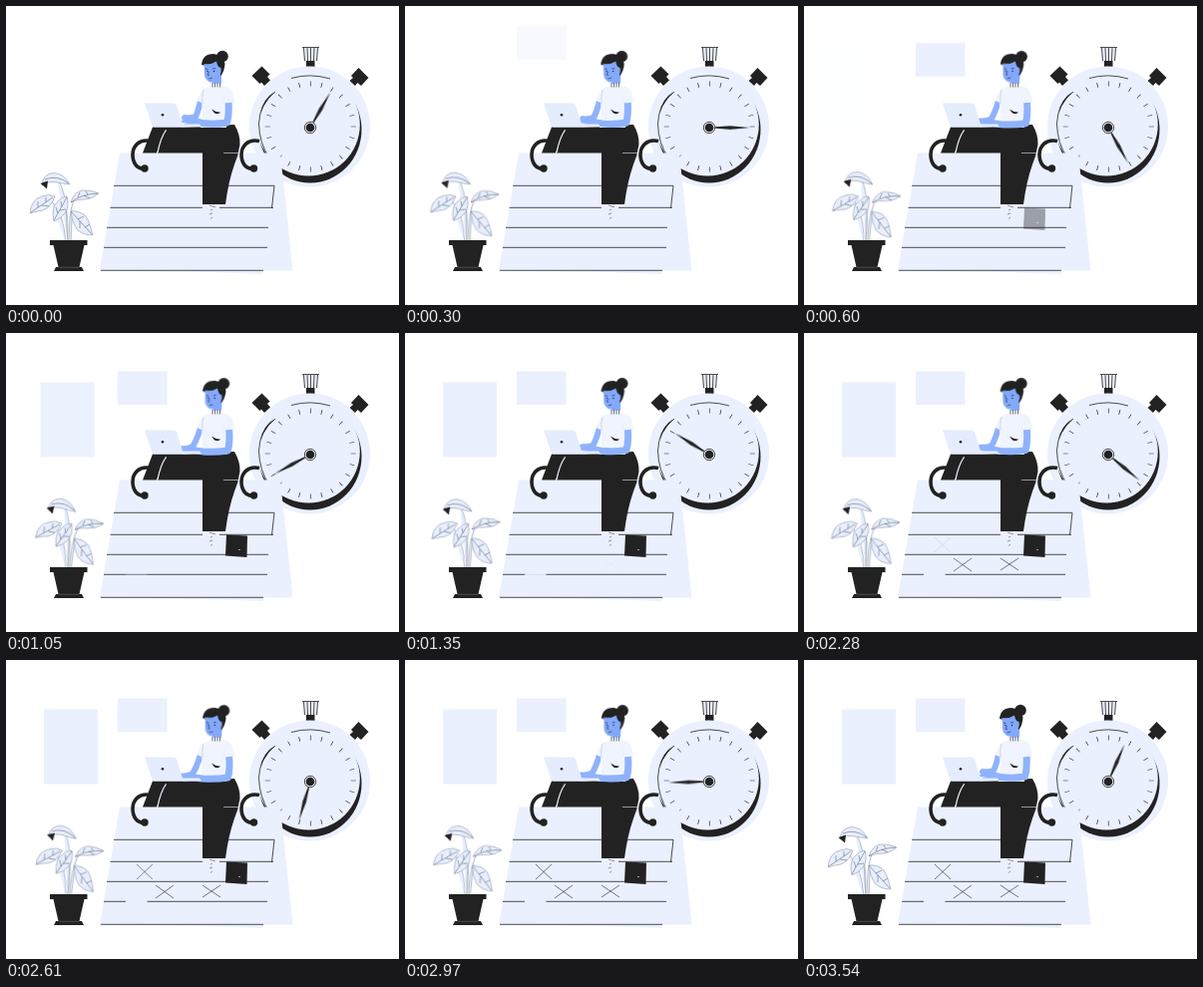
Animation of 394 by 300 pixels, one loop 3570 ms. Source, as an HTML page:

```html
<!DOCTYPE html>
<html lang="en">
<head>
<meta charset="utf-8">
<title>Time planning</title>
<style>
html, body { margin: 0; width: 100%; height: 100%; overflow: hidden; background: #fff; }
svg { display: block; width: 100vw; height: 100vh; }

:root { --loop: 3570ms; --swing: 892.5ms; --ease: cubic-bezier(.37, 0, .63, 1); }
.ink { fill: #222; }
.pale { fill: #eaf0fe; }
.skin { fill: #84a9fb; }
.line { fill: none; stroke: #222; stroke-width: .8; }
.limb { fill: none; stroke: #8fb2fd; stroke-linecap: round; stroke-linejoin: round; }
.leaf path { fill: #e7eefe; stroke: #7f8798; stroke-width: .5; }
.leaf .vein { fill: none; stroke: #4b5160; }

/* one-shot entrances, restarted with every loop */
.in { animation: var(--loop) var(--ease) infinite; }
.small { animation-name: small; }
.tall { animation-name: tall; }
.box { animation-name: box; }
.gap { animation-name: gap; }
.c1 { animation-name: c1; }
.c2 { animation-name: c2; }
.c3 { animation-name: c3; }
@keyframes small { 0% { opacity: 0; transform: translateY(-30px); } 19.6%, 100% { opacity: 1; transform: none; } }
@keyframes tall { 0%, 14% { opacity: 0; transform: translateX(-32px); } 33.6%, 100% { opacity: 1; transform: none; } }
@keyframes box { 0%, 8.4% { opacity: 0; } 28%, 100% { opacity: 1; } }
@keyframes gap { 0%, 22.4% { opacity: 0; } 42%, 100% { opacity: 1; } }
@keyframes c1 { 0%, 35% { opacity: 0; } 54.6%, 100% { opacity: 1; } }
@keyframes c2 { 0%, 47.6% { opacity: 0; } 67.2%, 100% { opacity: 1; } }
@keyframes c3 { 0%, 58.8% { opacity: 0; } 78.4%, 100% { opacity: 1; } }

/* stopwatch: two turns per loop */
.hand { transform-origin: 305px 122px; animation: turn var(--loop) linear infinite; }
@keyframes turn { from { transform: rotate(29.5deg); } to { transform: rotate(749.5deg); } }

/* back-and-forth sway, two cycles per loop */
.sway { animation: var(--swing) var(--ease) infinite alternate; }
.plant { transform-origin: 63px 237px; animation-name: plant; }
.side { animation-name: side; }
.head { transform-origin: 211px 81px; animation-name: head; }
.far { animation-name: far; }
.near { animation-name: near; }
.palm { animation-name: palm; }
@keyframes plant { to { transform: rotate(6.4deg); } }
@keyframes side { to { transform: translate(2.5px, 1.2px); } }
@keyframes head { to { transform: rotate(2.8deg); } }
@keyframes far {
  from { d: path("M195 95Q193 105 190 111Q185 113 179 112"); }
  to { d: path("M195 95Q191 108 187 114Q183 117 176 116.5"); }
}
@keyframes near {
  from { d: path("M223 95Q224 108 221.500 117Q209 119 197 117.500L186 115"); }
  to { d: path("M223.500 95Q225 109 222.500 118Q210 120 197 119L185 117.500"); }
}
@keyframes palm { to { transform: translate(-1px, 1.5px); } }
</style>
</head>
<body>
<svg viewBox="0 0 394 300">
  <!-- wall frames -->
  <rect class="pale in small" x="112" y="38.500" width="49.500" height="33.500"/>
  <rect class="pale in tall" x="38" y="49.500" width="54" height="75"/>

  <!-- stopwatch -->
  <g>
    <path class="ink" d="M246.500 70L256.500 60.500L264.500 68.500L262 71L265 74.500L259 80L256 76.500L254.500 78Z"/>
    <path class="ink" d="M346 70L353.500 62L363.500 72L356 80L352.500 77L350 80L344.500 75L348 72Z"/>
    <rect class="ink" x="301" y="55" width="8.500" height="6"/>
    <path class="pale" d="M297 41.500H314L312.500 55H298.500Z"/>
    <path class="line" d="M297 41.500H314M298.500 42L299.500 55M302 42L302.500 55M305.500 42V55M309 42L308.500 55M312.500 42L311.500 55" stroke-width=".6"/>
    <circle class="pale" cx="304.500" cy="121" r="60.500"/>
    <ellipse class="ink" cx="305" cy="124" rx="51.500" ry="53.500"/>
    <circle class="pale" cx="303.300" cy="119" r="51.500"/>
    <path class="line" d="M270 86Q254 99 253.500 118Q254 138 264 152"/>
    <path d="M269 86Q258 93 254.500 108Q260 95 269 86Z" class="ink"/>
    <path class="line" d="M286 72.500Q305 67 325 73"/>
    <circle class="line" cx="305.300" cy="121" r="43" pathLength="24" style="stroke-width:5;stroke-dasharray:.06 .94;stroke-dashoffset:.03"/>
    <path class="ink hand" d="M304.300 116L303.200 101L305 81L306.800 101L305.700 116Z"/>
    <circle class="line" cx="305" cy="122" r="5.700"/>
    <circle class="ink" cx="305" cy="122" r="4.300"/>
  </g>

  <!-- desk planner -->
  <path class="pale" d="M114 147.500H275L287.500 265.500H258L257.500 269L200 267L94 265.500Z"/>
  <path class="line" d="M108 180.300H269L266.500 203M104.500 202.300H197M214 202.300H268M101 222.300H263M98 242.300H262M95 265.300H258"/>
  <path class="pale in gap" d="M120 223H141.500V244H120Z"/>
  <g class="line" style="stroke-width:.6">
    <path class="in c1" d="M197 226L215 238M197 238L215 226"/>
    <path class="in c2" d="M150 226L168 239M150 239L168 226"/>
    <path class="in c3" d="M131 205L147 220M131 220L147 205"/>
  </g>
  <g class="in box">
    <path class="ink" d="M221 202.500L242 203.500L241.500 225L220 223.500Z"/>
    <path d="M233 217.500H235" stroke="#ccd" stroke-width=".7"/>
  </g>

  <!-- legs and table -->
  <path class="line" d="M204 200L210 202M205 205L207 204M204 209L207 208M205 213.500L207 212" style="stroke:#8a8490;stroke-width:.9"/>
  <path class="ink" d="M147 121.500H196V124.500H160L151 147.500H137Z"/>
  <path class="ink" d="M161 124Q194 120 229 119Q235 129 234.500 139Q233 150 229 159Q223 176 220 199H197V147.500H152Q155 133 161 124Z"/>
  <path d="M160.500 124.500Q155 132 152 147" fill="none" stroke="#eaf0fe" stroke-width="1.200"/>
  <path d="M218 147.500H233" stroke="#c5cad6" stroke-width=".7"/>

  <!-- rings -->
  <g fill="none" stroke="#222" stroke-width="3.600">
    <path id="ring" d="M145 135.500C133 133 127 141 127 149C127 157 131 164 139 163"/>
    <use href="#ring" x="109"/>
  </g>
  <circle class="ink" cx="139" cy="163" r="3.700"/>
  <circle class="ink" cx="248.500" cy="163" r="3.700"/>

  <!-- woman -->
  <path class="limb sway far" d="M195 95Q193 105 190 111Q185 113 179 112" stroke-width="6"/>
  <path fill="#f0f4fe" d="M206 80H217Q225 81 227 87L229.500 97L220 98.500L221 122H195Q198 109 196 97L191.500 95Q195 85 199 82.500Z"/>
  <path class="line" d="M198 84Q196 91 197 98M219 88V97" style="stroke:#aeb7cb;stroke-width:.5"/>
  <path class="ink" d="M206 103.500Q211 107 215 106.500Q213 109.500 209 107.500Z"/>
  <path class="limb sway near" d="M223 95Q224 108 221.500 117Q209 119 197 117.500L186 115" stroke-width="7"/>
  <path fill="#f0f4fe" d="M218 84L226 85L229.500 96.500L218.500 97.500Z"/>
  <path class="limb sway palm" d="M187 116L177 116M188 118L180 119" stroke-width="2.400"/>
  <g class="sway head">
    <path class="skin" d="M206 69H216V79H207Z"/>
    <circle class="ink" cx="217" cy="50.500" r="5.800"/>
    <path class="ink" d="M196 59Q197 48 208 48Q218 49 219.500 58Q219 65 215.500 70L209 62Z"/>
    <path class="skin" d="M198.500 58Q206 59 211 55.500Q212 62 215.500 62Q216.500 67 213 72Q209 77 204.500 76.500Q199 74 199 68Z"/>
    <path class="line" d="M200 63L202.500 63.500M207 63L210 62.500M203.500 66L202 69L204 69.500M203.500 73L207 72" style="stroke:#26345f;stroke-width:.7"/>
    <circle class="ink" cx="202" cy="65.500" r=".7"/>
    <circle class="ink" cx="208.500" cy="65.500" r=".7"/>
  </g>
  <path d="M206 77.500H216.500L217 82H206Z" fill="#f0f4fe"/>
  <path class="line" d="M207 77V81.500M209.500 77V81.500M212 77V81.500M214.500 77V81.500" style="stroke-width:.6"/>

  <!-- laptop -->
  <path d="M139 97.500H168Q170 97.500 171 99.500L178 121.500H149Q147 121.500 146.500 120Z" fill="#e4ecfe"/>
  <path d="M177 118.500H194L196 121.500H177Z" fill="#e4ecfe"/>
  <circle class="ink" cx="157" cy="109.300" r="1.300"/>

  <!-- plant -->
  <g class="leaf sway plant">
    <g class="line" style="stroke:#8b919e;stroke-width:.7">
      <path d="M62 238Q63 190 51 172M60 238Q58 206 44 194M62 238Q60 210 60 193M64 238Q62 208 68 195M65 238Q66 218 66 207"/>
    </g>
    <path d="M36 180Q37 168 48 167.500Q58 168 64 179Q56 178 51 177Q43 175 36 180Z"/>
    <path class="vein" d="M39 174Q51 169 63 178"/>
    <path class="ink" style="fill:#222;stroke:none" d="M34.500 178L42 175.500L41 183.500Z"/>
    <g class="sway side">
      <path d="M24 208Q25 194 36 191Q43 188 49 191Q45 202 37 205Q30 206 24 208Z"/>
      <path class="vein" d="M25 207L47 192M32 202V196M36 200L43 201M40 197V192"/>
    </g>
    <path d="M48 216Q45 203 51 197Q56 191 61 191Q64 201 59 208Q55 213 48 216Z"/>
    <path class="vein" d="M48 215L61 192M52 208L50 202M54 205L60 204M56 201L55 196"/>
    <path d="M65 197Q68 187 76 185Q84 184 93 188Q86 194 79 194Q71 194 65 197Z"/>
    <path class="vein" d="M65 197Q75 189 92 188M72 192L74 187M78 190L84 193M82 189L80 186"/>
    <path d="M65 206Q74 205 80 211Q84 217 87 230Q77 230 71 224Q66 217 65 206Z"/>
    <path class="vein" d="M65 206L86 229M72 214L78 211M74 216V223M79 222L84 219"/>
  </g>
  <path class="ink" d="M44 235H81.500V240H78.500L73.500 262H76L78 266H48L50 262H52.500L47.500 240H44Z"/>
  <path d="M53 262.300H73" stroke="#777" stroke-width=".5"/>
</svg>
</body>
</html>
```
